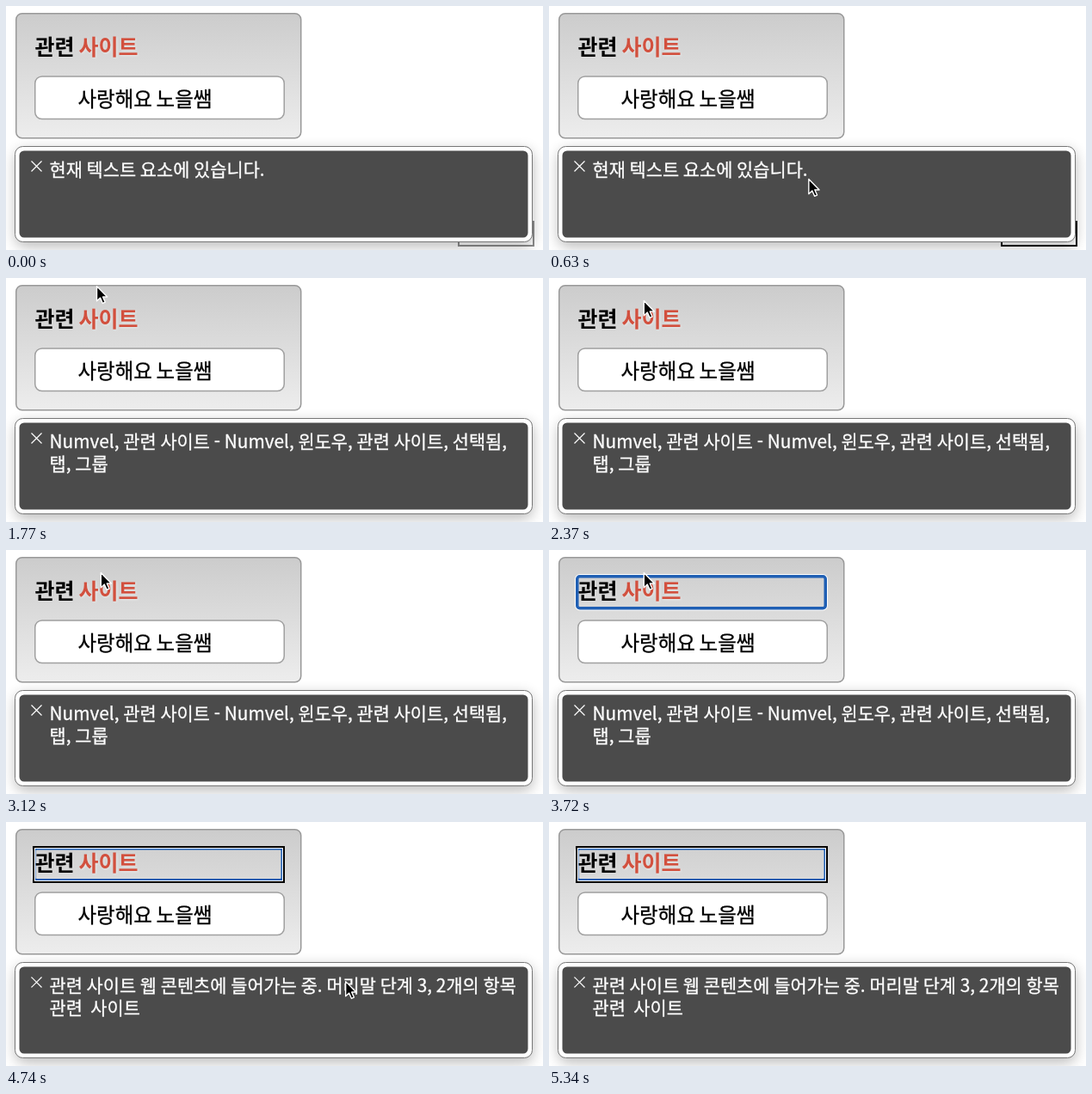
Write an HTML page that moves like this. It is 624 px wide and 284 px high and loops after 8 s.

```html
<!DOCTYPE html>
<html lang="ko">
<head>
<meta charset="utf-8">
<title>관련 사이트</title>
<style>
  html, body { margin: 0; width: 100%; height: 100%; overflow: hidden; background: #fff; }
  svg { display: block; width: 624px; height: 284px; }
  text { font-family: "Noto Sans CJK KR", "Noto Sans CJK", sans-serif; white-space: pre; word-spacing: -2px; }
  .title { font-size: 25px; font-weight: 700; }
  .accent { fill: #d2503e; text-shadow: 1px 1px 3px rgba(255, 255, 255, .45); }
  .field { font-size: 23.5px; stroke: #000; stroke-width: .3px; }
  .caption { font-size: 20.85px; word-spacing: -1.1px; fill: #fff; stroke: #fff; stroke-width: .3px; }
</style>
</head>
<body>
<svg viewBox="0 0 624 284">
  <defs>
    <linearGradient id="shade" x2="0" y2="1">
      <stop stop-color="#ccc"/>
      <stop offset="1" stop-color="#ededed"/>
    </linearGradient>
    <filter id="blur" x="-10%" y="-40%" width="120%" height="180%">
      <feGaussianBlur stdDeviation="8"/>
    </filter>
  </defs>

  <rect x="11.75" y="8.75" width="331" height="145" rx="7" fill="url(#shade)" stroke="#999" stroke-width="1.5"/>
  <text class="title" x="33.5" y="57.3">관련 <tspan class="accent">사이트</tspan></text>
  <rect x="33.75" y="82" width="289.5" height="49.5" rx="8" fill="#fff" stroke="#a0a0a0" stroke-width="1.5"/>
  <text class="field" x="83.5" y="116.5">사랑해요 노을쌤</text>

  <g id="focus" fill="none">
    <rect x="32" y="30" width="290" height="38.5" rx="4" stroke="#fff" stroke-width="4"/>
    <rect x="32.75" y="30.75" width="288.5" height="37" rx="3" stroke="#1f5fb4" stroke-width="3.5"/>
  </g>
  <g id="reader" fill="none">
    <rect x="33.5" y="30.5" width="288" height="38" stroke="#fff"/>
    <rect x="32" y="29" width="291" height="41" stroke="#000" stroke-width="2"/>
  </g>

  <rect x="11" y="168" width="601" height="112" rx="10" opacity=".27" filter="url(#blur)"/>
  <rect id="corner" x="526" y="251" width="87" height="28" fill="none" stroke="#000" stroke-width="2"/>
  <rect x="10.5" y="163.5" width="601" height="111" rx="9" fill="#fff" stroke="#777"/>
  <rect x="15.5" y="168.5" width="591" height="101" rx="5.5" fill="#4b4b4b"/>
  <path d="M29.5 180.5l12 12m0-12l-12 12" stroke="#fff" stroke-width="1.2"/>
  <text class="caption" id="line1" x="50.5" y="198.4"></text>
  <text class="caption" id="line2" x="50.5" y="224.4"></text>

  <g id="cursor">
    <circle id="click" r="27" fill="none" stroke="#444" stroke-width="2"/>
    <path d="M.8 1V18.2L4.8 14.5L7.6 20.8L10.5 19.5L7.8 13.4H13Z" stroke="#fff" stroke-width="1.4" stroke-linejoin="round"/>
  </g>
</svg>
<script>
  const LOOP = 8000, STEP = 30;
  const $ = id => document.getElementById(id);
  const clamp = v => Math.min(1, Math.max(0, v));
  const easeOut = s => 1 - (1 - s) ** 2;
  const easeIn = s => s * s;
  const easeBoth = s => s ** 3 * (s * (s * 6 - 15) + 10);

  const captions = [
    [0, '현재 텍스트 요소에 있습니다.', ''],
    [1380, 'Numvel, 관련 사이트 - Numvel, 윈도우, 관련 사이트, 선택됨,', '탭, 그룹'],
    [3780, '관련 사이트 웹 콘텐츠에 들어가는 중. 머리말 단계 3, 2개의 항목', '관련  사이트'],
  ];
  // start, end, from, to, easing, sideways bulge
  const moves = [
    [525, 1140, [391, 288], [103, 8], easeOut, 0],
    [1740, 1920, [103, 8], [109.5, 25.5], easeBoth, 3],
    [4470, 4815, [109.5, 25.5], [416, 197], easeBoth, 0],
    [5070, 5340, [416, 197], [424, 287], easeIn, 0],
  ];
  const clicks = [[1290, 1350], [2310, 2370], [3030, 3120]];

  function cursorAt(t) {
    const [start, end, a, b, ease, bulge] = moves.findLast(m => t >= m[0]) || moves[0];
    const s = clamp((t - start) / (end - start)), e = ease(s);
    return [a[0] + (b[0] - a[0]) * e + bulge * Math.sin(Math.PI * s), a[1] + (b[1] - a[1]) * e];
  }

  function draw(now) {
    const t = Math.floor(now % LOOP / STEP) * STEP;
    const [, first, second] = captions.findLast(c => t >= c[0]);
    $('line1').textContent = first;
    $('line2').textContent = second;
    $('corner').style.opacity = t < 1350 ? .45 + .55 * clamp(t / 300) : clamp((1440 - t) / 120);
    $('focus').style.opacity = t >= 3720 ? 1 : 0;
    $('reader').style.opacity = clamp((t - 3720) / 120);
    $('click').style.opacity = clicks.some(([on, off]) => t >= on && t < off) ? 1 : 0;
    $('cursor').setAttribute('transform', `translate(${cursorAt(t)})`);
  }

  const begin = performance.now();
  (function frame() {
    draw(performance.now() - begin);
    requestAnimationFrame(frame);
  })();
</script>
</body>
</html>
```
